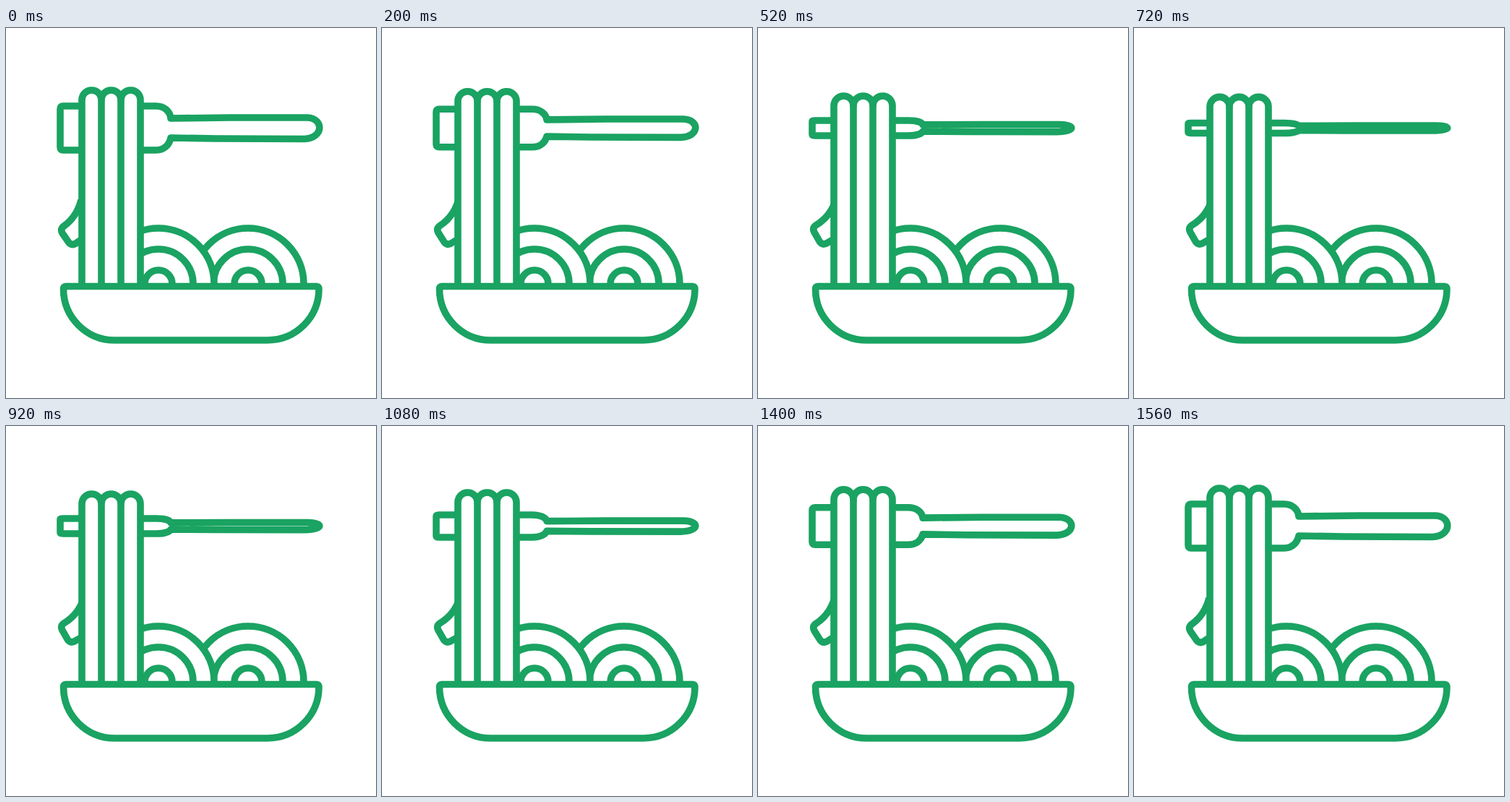
Write an HTML page that moves like this. It is 512x512 px and loops after 1.8 s.

```html
<!DOCTYPE html>
<html lang="en">
<head>
<meta charset="utf-8">
<title>Noodles</title>
<style>
  html, body { margin: 0; width: 100%; height: 100%; overflow: hidden; background: #fff; }
  svg { display: block; width: 100%; height: 100%; }
  path {
    fill: #fff;
    stroke: #1aa362;
    stroke-width: 9.6;
    stroke-linejoin: round;
    vector-effect: non-scaling-stroke;
  }
  .line { fill: none; }
</style>
</head>
<body>
<svg viewBox="0 0 512 512">
  <g id="right">
    <path d="M258 358V354a77 77 0 0 1 154 0V358"/>
    <path d="M287 358V354a48 48 0 0 1 96 0V358"/>
    <path d="M316 358V354a19 19 0 0 1 38 0V358"/>
  </g>
  <use href="#right" x="-124"/>
  <path id="leaf" d="M104 238C100 254 92 266 79 275Q75 279 78 284L87 297Q92 302 98 297L107 291"/>
  <path id="fork" d="M79 -30.5H208C219 -30.5 227 -23 228 -13.5L310 -14.5H417C440 -13.5 440 14 413 15L290 14.5L228 13.5C226 23 219 30.5 208 30.5H79Q75 30.5 75 26.5V-26.5Q75 -30.5 79 -30.5Z"/>
  <g id="noodles">
    <path d="M105 366V99.5a13.5 13.5 0 0 1 27 0a13.5 13.5 0 0 1 27 0a13.5 13.5 0 0 1 27 0V366"/>
    <path class="line" d="M132 366V99.5M159 366V99.5"/>
  </g>
  <path d="M79.5 361Q79.5 357.5 82.5 357.5H430Q433 357.5 433 361A71 71 0 0 1 362 432H150A71 71 0 0 1 79.5 361Z"/>
</svg>
<script>
  const LOOP = 1800, STEP = 40, FULL = 30.5;
  // time, half height of the fork head, speed
  const keys = [
    [0, FULL, -.01], [320, 21.5, -.045], [520, 10.5, -.045], [700, 7, 0],
    [920, 10.5, .028], [1200, 19.5, .032], [1400, 25.75, .031], [1560, FULL, .025]
  ];
  const [leaf, fork, noodles] = ['leaf', 'fork', 'noodles'].map(id => document.getElementById(id));

  function halfHeight(t) {
    const i = keys.findIndex(k => k[0] > t);
    if (i < 0) return FULL;
    const [t0, a, va] = keys[i - 1], [t1, b, vb] = keys[i];
    const d = t1 - t0, u = (t - t0) / d, w = 1 - u;
    return w * w * ((1 + 2 * u) * a + u * d * va) + u * u * ((3 - 2 * u) * b - w * d * vb);
  }

  function draw(now) {
    const h = halfHeight(Math.floor(now % LOOP / STEP) * STEP);
    const drop = FULL - h, tilt = Math.min(1, drop / 9);
    fork.setAttribute('transform', `translate(0 138.5) scale(1 ${h / FULL})`);
    noodles.setAttribute('transform', `translate(0 ${drop * .4})`);
    leaf.setAttribute('transform', `translate(0 ${-2 * tilt}) rotate(${5 * tilt} 75 280)`);
  }

  const start = performance.now();
  function tick() {
    draw(performance.now() - start);
    requestAnimationFrame(tick);
  }
  tick();
</script>
</body>
</html>
```
